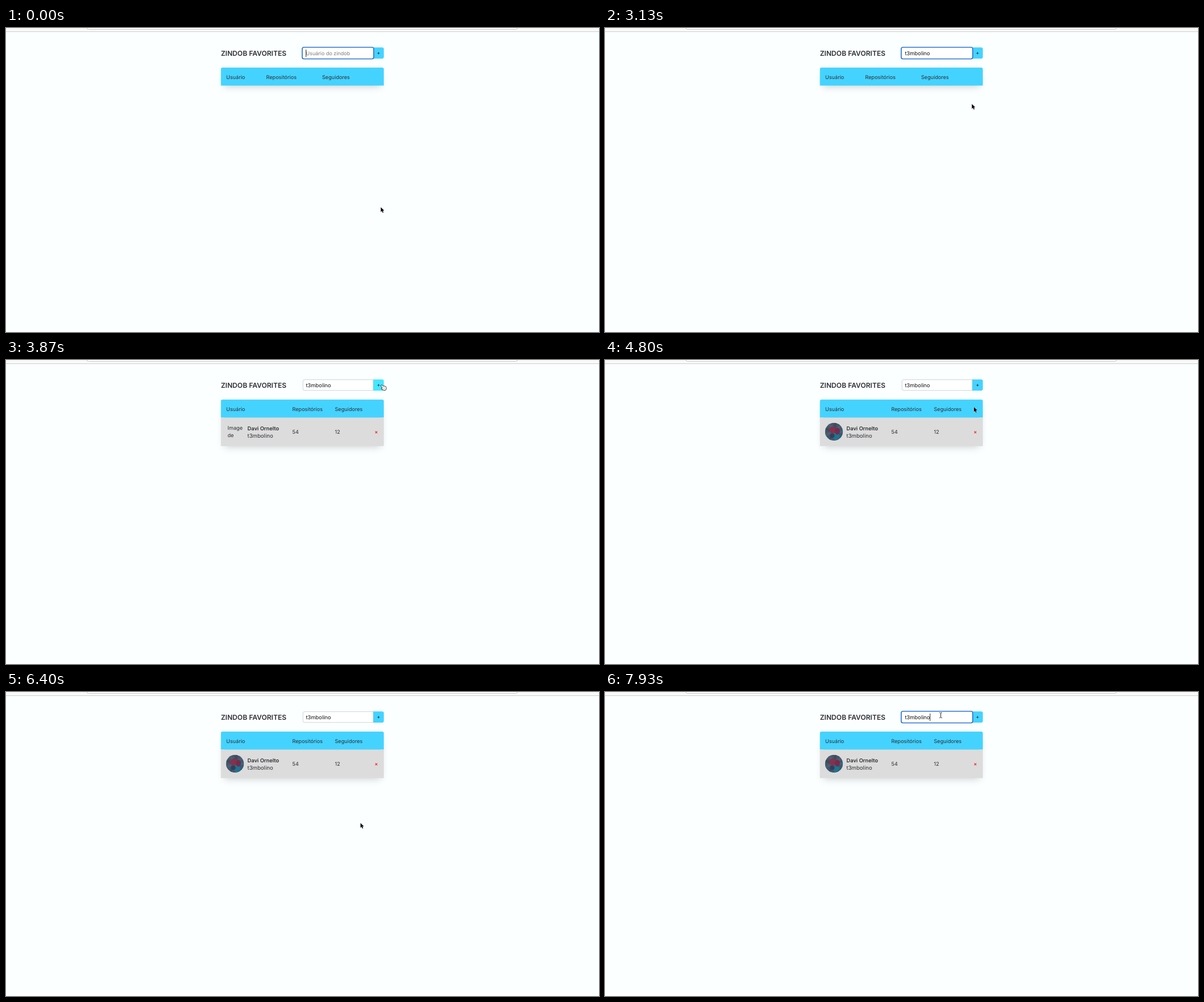
An HTML page with a canvas for the animation above (8 s loop, 1045 by 536 pixels).

```html
<!DOCTYPE html>
<html lang="pt-BR">
<head>
<meta charset="utf-8">
<title>Favorites</title>
<style>
  html, body { margin: 0; width: 100%; height: 100%; overflow: hidden; background: #fbffff; }
  canvas { display: block; }
</style>
</head>
<body>
<canvas id="stage" width="1045" height="536"></canvas>
<script>
const ctx = document.getElementById('stage').getContext('2d');
const LOOP = 8000, TICK = 1000 / 15;
const CYAN = '#44d3ff', CYAN_HOVER = '#44e7ff', INK = '#2d2e33';
const USER = 't3mbolino';
const TABLE = { left: 378.7, right: 665.8, top: 69.7, head: 101.6, bottom: 151.8 };

const linear = t => t;
const easeOut = t => 1 - (1 - t) ** 2;

// Pointer strokes: start and end tick, easing, Bezier points
const STROKES = [
  [43, 47, linear, [660.5, 316], [648, 320], [646.5, 134]],
  [47, 51, linear, [646.5, 134], [752, 60], [661, 44]],
  [64, 68, linear, [661, 44], [670, 60.5]],
  [69, 82, linear, [670, 60.5], [740, 90], [285, 140], [569, 118]],
  [82, 90, easeOut, [569, 118], [575, 216], [605, 48], [593, 55]],
  [92, 97, linear, [593, 55], [636, 165], [621, 275]],
  [102, 114, linear, [621, 275], [570, 104], [591.7, 41]]
];

function bezier(points, t) {
  if (points.length === 1) return points[0];
  const mix = (a, b) => a + (b - a) * t;
  return bezier(points.slice(1).map(([x, y], i) => [mix(points[i][0], x), mix(points[i][1], y)]), t);
}

function pointerAt(tick) {
  const [from, to, ease, ...points] = STROKES.findLast(s => s[0] <= tick) || STROKES[0];
  const t = Math.min(1, Math.max(0, (tick - from) / (to - from)));
  return bezier(points, ease(t));
}

// Two bursts of typing: the first slows down, the second is even
const keyTick = i => i < 5
  ? 12 + Math.floor(2.2 * i + 0.4 * i * i)
  : 31 + Math.round(1.7 * (i - 5));

const typedText = tick => [...USER].filter((_, i) => keyTick(i) <= tick).join('');

const caretShown = tick => [[0, 5], [12, 20], [22, 38], [119, 120]]
  .some(([from, to]) => tick >= from && tick < to);

function rect(x, y, w, h, fill, radii = 0) {
  ctx.beginPath();
  ctx.roundRect(x, y, w, h, radii);
  ctx.fillStyle = fill;
  ctx.fill();
}

function outline(x, y, w, h, color, width, radii) {
  ctx.beginPath();
  ctx.roundRect(x, y, w, h, radii);
  ctx.strokeStyle = color;
  ctx.lineWidth = width;
  ctx.stroke();
}

function text(str, x, y, { size = 9.15, weight = 400, color = INK, align = 'left' } = {}) {
  ctx.font = `${weight} ${size}px Inter, "Open Sans", sans-serif`;
  ctx.textRendering = 'geometricPrecision';
  ctx.textAlign = align;
  ctx.fillStyle = color;
  ctx.fillText(str, x, y);
  return ctx.measureText(str).width;
}

function disc(x, y, rx, ry, color, turn = 0) {
  ctx.beginPath();
  ctx.ellipse(x, y, rx, ry, turn, 0, 7);
  ctx.fillStyle = color;
  ctx.fill();
}

function clipped(path, paint) {
  ctx.save();
  ctx.clip(path);
  paint();
  ctx.restore();
}

function drawBrowserEdge() {
  rect(0, 0, 1045, 6, '#f9f9f7');
  rect(0, 6, 1045, 1, '#cdcecd');
  rect(142.5, -10, 759, 12.5, '#ffffff', 3);
  outline(142.5, -10, 759, 12.5, '#cacac8', 1, 3);
}

function drawForm(tick, hover) {
  const focused = tick < 54 || tick >= 118;
  text('ZINDOB FAVORITES', 378.7, 48.5, { size: 12.1, weight: 600 });
  rect(647, 34.3, 18.8, 19.8, hover ? CYAN_HOVER : CYAN, [0, 3, 3, 0]);
  text('+', 656.5, 47.2, { size: 9, color: '#111', align: 'center' });
  rect(523, 34.5, focused ? 125 : 124, 19.5, '#ffffff', [3, 0, 0, 3]);
  if (focused) outline(522, 34, 126, 20.5, '#2f74d0', 1.7, 3);
  else outline(523.3, 34.7, 123.8, 19, '#c3c8ca', 0.8, [3, 0, 0, 3]);

  const typed = typedText(tick);
  if (!typed) text('Usuário do zindob', 528.5, 47.6, { size: 9, color: '#7b7b7b' });
  const width = text(typed, 528.5, 47.6, { size: 9.4, color: '#111' });
  if (caretShown(tick)) rect(528.3 + width, 38, 0.9, 13, '#111');
}

function drawAvatar() {
  const x = 403.5, y = 126.5;
  const frame = new Path2D();
  frame.arc(x, y, 15.7, 0, 7);
  clipped(frame, () => {
    rect(x - 16, y - 16, 32, 32, '#46566a');
    // Slate leaves turning to teal on the lower right
    for (let i = 0; i < 9; i++) {
      const a = i * Math.PI * 2 / 9;
      const teal = Math.max(0, Math.sin(a + 0.6));
      disc(x + 11 * Math.cos(a), y + 11 * Math.sin(a), 5, 2.4,
        `hsl(${208 - 12 * teal} ${22 + 45 * teal}% ${i % 2 ? 30 : 37}%)`, a);
    }
    disc(x + 3, y + 7, 7, 6, '#1f7390', 0.5);
    disc(x - 2, y - 3, 6.5, 6, '#87304e');
    disc(x + 6, y - 1, 4.5, 6, '#742c4c');
    disc(x - 3, y + 7, 4, 4, '#31405a');
  });
}

function drawBrokenImage() {
  const frame = new Path2D();
  frame.rect(388, 111, 29, 31);
  clipped(frame, () => {
    text('Imagem', 390.5, 123);
    text('de', 390.5, 135.6);
  });
}

function drawRow(tick) {
  rect(TABLE.left, TABLE.head, TABLE.right - TABLE.left, TABLE.bottom - TABLE.head, '#dcdcdc');
  if (tick >= 62) drawAvatar();
  else drawBrokenImage();
  text('Davi Ornelto', 425.5, 123.8, { size: 9.3, weight: 600 });
  text(USER, 425.5, 136.8, { size: 9.6 });
  text('54', 504.5, 130);
  text('12', 579.5, 130);
  text('×', 652.5, 129.6, { size: 9, weight: 500, color: '#f00', align: 'center' });
}

function drawTable(tick) {
  const filled = tick >= 58;
  const { left, right, top, head, bottom } = TABLE;
  const inset = 6;
  ctx.save();
  ctx.shadowColor = 'rgba(40, 45, 55, 0.25)';
  ctx.shadowBlur = 13;
  ctx.shadowOffsetY = 7;
  rect(left + inset, top + inset, right - left - 2 * inset, (filled ? bottom : head) - top - 2 * inset, CYAN);
  ctx.restore();
  rect(left, top, right - left, head - top, CYAN, [3, 3, 0, 0]);
  text('Usuário', 388, 89.5);
  text('Repositórios', filled ? 504.5 : 458.5, 89.5);
  text('Seguidores', filled ? 579.5 : 557, 89.5);
  if (filled) drawRow(tick);
}

const ARROW = new Path2D('M0 0V8.4L1.9 6.6 3.3 9.8 4.8 9.1 3.4 6H6Z');
const HAND = new Path2D('M0 .8Q.8-.3 1.7.5L4 2.6Q5.5 1.5 6.3 2.6 7.7 2.2 8 3.6 9.2 3.8 9 5.3L8.9 7.3 6.6 9.6 3.4 8.6.8 6.6Q.5 5.4 2 5.6L3 5.9.1 2Q-.4 1.4 0 .8Z');
const BEAM = new Path2D('M-2.3-4.5Q-.4-4.7 0-3.6 .4-4.7 2.3-4.5M0-3.6V3.6M-2.3 4.5Q-.4 4.7 0 3.6 .4 4.7 2.3 4.5');

function drawShape(path, fill, stroke, width) {
  ctx.lineJoin = 'round';
  ctx.lineWidth = width;
  ctx.strokeStyle = stroke;
  ctx.stroke(path);
  if (!fill) return;
  ctx.fillStyle = fill;
  ctx.fill(path);
}

function drawPointer(tick, hover) {
  ctx.save();
  ctx.translate(...pointerAt(tick));
  if (tick >= 114) drawShape(BEAM, null, '#222', 1);
  else if (hover) drawShape(HAND, '#e6e8e8', '#222', 1.4);
  else drawShape(ARROW, '#000', '#fff', 0.9);
  ctx.restore();
}

function draw(ms) {
  const tick = Math.floor((ms % LOOP + 4) / TICK) % 120;
  const hover = tick >= 51 && tick < 66;
  rect(0, 0, 1045, 536, '#fbffff');
  drawBrowserEdge();
  drawForm(tick, hover);
  drawTable(tick);
  drawPointer(tick, hover);
}

const start = performance.now();
function loop() {
  draw(performance.now() - start);
  requestAnimationFrame(loop);
}
loop();
</script>
</body>
</html>
```
